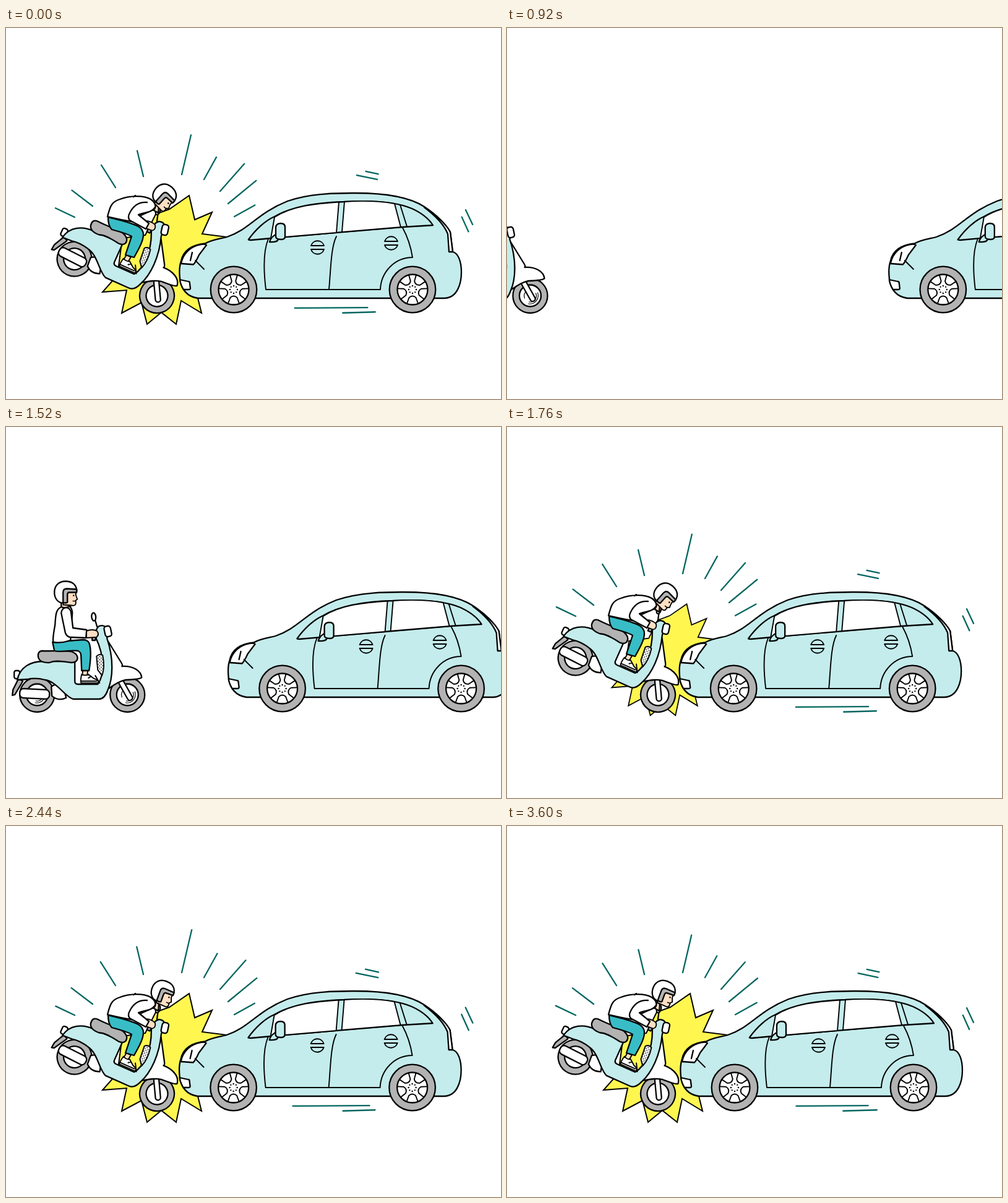
Animation, 800 px wide and 600 px high, one loop 3640 ms. Source, as an HTML page:

```html
<!DOCTYPE html>
<html lang="en">
<head>
<meta charset="utf-8">
<title>Collision</title>
<style>
  html, body { margin: 0; width: 100%; height: 100%; overflow: hidden; background: #fff; }
  svg { display: block; width: 800px; height: 600px; }
  svg * { stroke-linejoin: round; stroke-linecap: round; }
  #stage { fill: none; stroke: #000; stroke-width: 2.3; }
  .white { fill: #fff; }
  .mint { fill: #c4ecec; }
  .teal { fill: #38bdc6; }
  .gray { fill: #b3b3b3; }
  .skin { fill: #fddfc3; }
  .thin { stroke-width: 1.2; }
  .fine { stroke-width: 1.9; }
  .dot { fill: #000; stroke: none; }
  #burst { fill: #fff750; stroke-width: 2; stroke-linejoin: miter; }
  #streaks { stroke: #00665f; stroke-width: 2.3; }
</style>
</head>
<body>
<svg viewBox="0 0 800 600">
  <defs>
    <pattern id="mesh" width="5" height="5" patternUnits="userSpaceOnUse">
      <rect width="5" height="5" fill="#fff" stroke="none"/>
      <circle class="dot" cx="1.200" cy="1.200" r=".85"/>
      <circle class="dot" cx="3.700" cy="3.700" r=".85"/>
    </pattern>
    <g id="carWheel">
      <circle class="gray" r="37.3"/>
      <circle class="white" r="24.5"/>
      <g id="spokes" stroke-width="1.9"></g>
    </g>
    <g id="scooterWheel">
      <circle class="gray" r="28"/>
      <circle class="white" r="17.5"/>
    </g>
    <!-- helmeted head, centred on the helmet -->
    <g id="head">
      <path class="skin fine" d="M2 -4L17 -3L16.500 4L19 11L16.500 13L16.500 18Q16 22 10 21L-4 20Z"/>
      <path class="white" d="M18 -2C18 -13 10 -18 0 -18C-12 -18 -18 -10 -18 0C-18 9 -13 17 -4 17L2 14V-3Z"/>
      <path class="gray" d="M-4 16V0Q-4 -6 2 -6L18 -5V0H6Q3 0 3 4V16Q0 18 -4 16Z"/>
      <circle class="dot" cx="13" cy="5" r="1.300"/>
      <path stroke-width="1.6" d="M12 14H16"/>
    </g>
  </defs>

  <g id="stage">
    <g id="streaks"></g>
    <path id="burst" d="M296 271L305 310L333 298L317 333L357 338L330 400L310 437L316 461L283 441L275 479L251 460L228 479L219 444L187 461L195 424L156 427L180 400L188 340L225 335L242 301L264 293Z"/>

    <g id="scooter">
      <path class="white" d="M147 323L144 313"/>
      <ellipse class="white" cx="141.500" cy="307" rx="3.400" ry="6.500" transform="rotate(-6 141.500 307)"/>
      <path class="gray" d="M10 434L11 425L20 407L27 411L14 433Z"/>
      <use href="#scooterWheel" x="50" y="433"/>
      <use href="#scooterWheel" x="196" y="433"/>
      <g id="spin">
        <path id="arcs" class="thin" d="M205 429A10 10 0 0 1 194 443M208 428A13.500 13.500 0 0 1 193 446M187 437A10 10 0 0 1 192 424M59 429A10 10 0 0 1 48 443M62 428A13.500 13.500 0 0 1 47 446"/>
      </g>
      <path class="white" d="M73 420Q83 412 92 420L97 438Q84 444 74 435Z"/>
      <rect class="white" x="22" y="424" width="48" height="15" rx="6" transform="rotate(3 46 431)"/>
      <rect class="white" x="13" y="394" width="9" height="13" rx="3"/>
      <path d="M186 413L200 438" stroke-width="10.500"/>
      <path d="M186 413L200 438" stroke="#fff" stroke-width="6"/>
      <path class="white" d="M160 342L165 347L186 381Q189 386 187 387C205 386 218 394 219 405Q217 408 193 409C183 411 176 416 164 424Z"/>
      <path class="mint" d="M18 409C22 388 40 379 60 379L111 379V411Q111 416 116 416H148C159 402 159 370 145 341Q142 329 150 322Q162 318 163 332V342C174 374 173 406 164 426Q159 440 150 440H108C94 435 82 412 63 409Q48 405 34 408Z"/>
      <path class="fine" fill="url(#mesh)" d="M146 371Q150 366 156 369Q160 389 155 402L148 393Z"/>
      <path class="fine" d="M144 402L151 414"/>
      <rect class="white" x="159" y="322" width="10.500" height="17" rx="4" transform="rotate(-12 164 330)"/>
      <path class="gray" d="M52 373Q50 363 58 362C75 363 90 361 105 363Q117 367 115 376Q113 381 105 381C90 379 80 377 70 381Q55 382 52 373Z"/>
      <path class="skin fine" d="M124 393L123 402H131L132 393Z"/>
      <path class="white fine" d="M122 400Q120 408 121 414H149Q150 409 142 407L133 400Q128 403 122 400ZM122 411H146M133 406L137 403"/>
      <path class="gray" d="M139 339L146 336L144 345L139 345Z"/>
      <path class="skin fine" d="M129 330Q140 326 147 330Q151 336 146 340L130 341Z"/>
    </g>

    <g id="upright">
      <path class="teal" d="M75 348L78 362C90 365 105 360 116 362Q121 364 121 370L122 394H134C137 375 138 360 134 349Q131 344 124 344Z"/>
      <g id="torso">
        <path class="skin" d="M89 281V293H104V284Z"/>
        <path class="white" d="M89 291C80 295 80 305 79 320C77 332 75 340 76 348Q90 350 104 345L107 300Q106 292 102 290Q95 294 89 291Z"/>
        <path class="white" d="M89 301C90 289 104 289 105 301L108 325L130 328L129 341L103 340Q96 338 95 330Z"/>
        <use href="#head" x="96" y="267.500"/>
      </g>
    </g>

    <g id="thrown">
      <path class="teal" d="M165 306C165 315 167 322 171 326C182 329 195 332 203 337L193 367L207 371C214 358 222 345 222 334Q222 326 214 321C200 314 185 311 165 306Z"/>
      <path class="skin" d="M236 280L247 288L246 299L234 292Z"/>
      <path class="white" d="M164 305C168 290 170 281 184 277C200 271 222 270 234 277Q245 285 240 293L216 304L208 314Q185 310 164 305ZM206 273L209 271"/>
      <path class="white" d="M241 290C235 299 223 298 214 302L231 316L226 325L200 311Q196 306 200 299C206 287 216 281 228 282"/>
      <g id="thrownHead"><use href="#head"/></g>
    </g>

    <g id="car">
      <path class="mint" d="M310 437C290 434 283 420 281 405C280 395 280 385 283 377C286 362 297 351 322 348.500C330 343 345 341 357 338C395 325 405 300 455 280C495 266 545 267 565 267C610 267 650 272 676 289C697 303 711 318 718 330L722 362C731 364 736 378 736 395C736 412 730 437 708 437Z"/>
      <path class="white" d="M283 381L303 382.500Q307 378 312 367L324 351Q322 349 315 350C300 352 286 364 283 381ZM301 363L298 376M281 407L295 410Q297 410 297 413L298 421Q298 423 295 423H287Q282 415 281 407Z"/>
      <path class="fine" d="M306 376L320 390"/>
      <path class="white" d="M676 290C695 302 712 318 718 330L722 362H716L714 333C708 318 692 302 676 290Z"/>
      <path class="mint" d="M392 342C404 325 420 311 434 305C466 286 510 282 546 281C600 278 635 283 656 292Q680 303 690 319L640 322L440 339L396 343Q391 343 392 342Z"/>
      <path class="white fine" d="M434 306C462 288 500 284 538 281.500L534 331L428 340ZM547 281C575 279 605 280 628 284L638 322L543 330Z"/>
      <path class="fine" d="M637 286L648 321M424 341C416 360 416 390 420 423H605C606 395 628 371 657 371Q653 345 641 323M534 337C525 355 525 390 522 423"/>
      <path class="fine" d="M493 352A11 11 0 0 1 514 352ZM493 358A11 11 0 0 0 514 358ZM612 345A11 11 0 0 1 633 345ZM612 351A11 11 0 0 0 633 351Z"/>
      <path class="mint" d="M426 346Q428 337 440 332L440 342Q438 347 426 346Z"/>
      <path class="mint" d="M436 337V322Q437 316 444 316Q451 316 451 322V337Q451 342 445 342Q436 342 436 337Z"/>
      <use href="#carWheel" x="368" y="423"/>
      <use href="#carWheel" x="657" y="423"/>
    </g>
  </g>
</svg>
<script>
const LOOP = 3640, RESTART = 480, IMPACT = 1720;
const PULSE = 625, SWAY = 240;
const $ = id => document.getElementById(id);
const place = (id, transform) => $(id).setAttribute("transform", transform);
const show = (id, on) => { $(id).style.display = on ? "" : "none"; };

// Fully extended strokes: x1, y1, x2, y2, stagger
const rays = [
  [111, 306, 69, 286, 4], [140, 288, 94, 253, 3], [177, 258, 146, 209, 2],
  [222, 240, 209, 186, 1], [284, 237, 302.5, 158, 0], [320, 245, 346, 198, 1],
  [346, 264, 399, 204, 2], [359, 284, 421, 233, 3], [369, 305, 414, 280, 4]
];
const skids = [
  [446, 453, 605, 452, 2], [535, 461, 606, 459, 4],
  [562, 237, 605, 246, 1], [578, 231, 605, 237, 2],
  [735, 302, 749, 333, 1], [741, 290, 756, 322, 2]
];

$("spokes").innerHTML =
  Array.from({ length: 5 }, (_, i) =>
    `<path transform="rotate(${i * 72 + 36})" d="M-9 -22.500L-5.500 -13Q0 -8 5.500 -13L9 -22.500"/>`).join("") +
  Array.from({ length: 8 }, (_, i) =>
    `<circle class="dot" r="1.200" cy="-6" transform="rotate(${i * 45})"/>`).join("");

// Rays grow from their inner end, skid lines from their middle.
function drawStreaks(t) {
  const line = anchor => ([x1, y1, x2, y2, stagger]) => {
    const phase = 2 * Math.PI * (t - 2040) / PULSE + (2 - stagger) * 0.38;
    const size = 0.865 + 0.135 * Math.cos(phase);
    const at = (a, b, k) => (a + (b - a) * (anchor + (k - anchor) * size)).toFixed(2);
    return `M${at(x1, x2, 0)} ${at(y1, y2, 0)}L${at(x1, x2, 1)} ${at(y1, y2, 1)}`;
  };
  const d = rays.map(line(0)).concat(skids.map(line(0.5))).join("");
  $("streaks").innerHTML = `<path d="${d}"/>`;
}

function burstScale(age) {
  if (age < 120) return 0.6 + 0.52 * Math.sin(age / 120 * Math.PI / 2);
  if (age < 240) return 1.06 + 0.06 * Math.cos((age - 120) / 120 * Math.PI);
  return 1;
}

function drawCrash(t) {
  const age = t - IMPACT;
  drawStreaks(t);
  place("burst", `translate(255 385) scale(${burstScale(age)}) translate(-255 -385)`);
  place("scooter", "translate(244 433) rotate(24) translate(-196 -433)");
  place("car", `translate(${-2 * Math.exp(-age / 450)} 0)`);
  const raised = Math.floor(age / SWAY) % 2;
  place("thrownHead", raised ? "translate(253 268) rotate(20)" : "translate(256 271) rotate(42)");
}

function drawApproach(t) {
  const left = t - 1520;
  const run = left - 7.45e-5 * left * left;
  const bob = 1.5 * Math.cos(2 * Math.PI * left / 400) - 1.5;
  place("car", `translate(${79 - 0.412 * run} 0)`);
  place("scooter", `translate(${0.2533 * run} 0)`);
  place("upright", `translate(${0.2533 * run} 0)`);
  place("torso", `translate(0 ${bob})`);
}

const start = performance.now();
function frame() {
  const t = (performance.now() - start) % LOOP;
  const crashed = t < RESTART || t >= IMPACT;
  for (const id of ["streaks", "burst", "thrown"]) show(id, crashed);
  for (const id of ["upright", "arcs"]) show(id, !crashed);
  if (crashed) drawCrash(t < RESTART ? t + LOOP : t);
  else drawApproach(t);
  requestAnimationFrame(frame);
}
frame();
</script>
</body>
</html>
```
